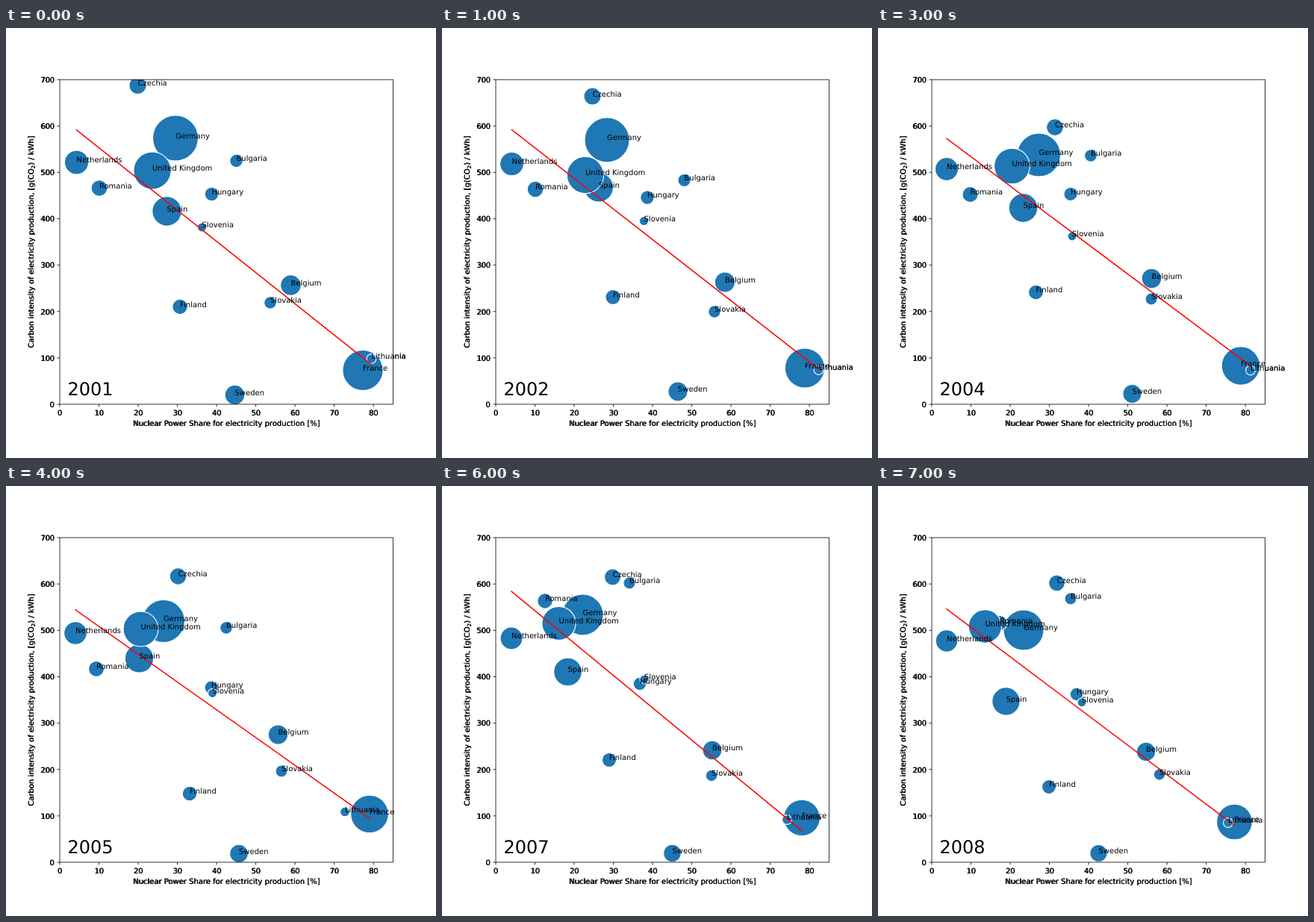
Recreate the animation shown at these times as an HTML page. Size 576x576 px, loop 8 s.

```html
<!DOCTYPE html>
<html lang="en">
<head>
<meta charset="utf-8">
<title>Nuclear share and carbon intensity</title>
<style>
  html, body { margin: 0; width: 100%; height: 100%; overflow: hidden; background: #fff; }
  svg { display: block; width: 100vw; height: 100vh; }
  text { font: 10px "DejaVu Sans", sans-serif; text-rendering: geometricPrecision; white-space: pre; }
  circle { fill: #1f77b4; stroke: #fff; stroke-width: 1.1; }
  .axis { fill: none; stroke: #000; stroke-width: .8; }
  #fit { stroke: #f00; stroke-width: 1.5; stroke-linecap: square; }
  #year { font-size: 24px; }
</style>
</head>
<body>
<svg id="stage" viewBox="0 0 576 576">
  <clipPath id="inside"><rect x="72" y="69.1" width="446.4" height="434.9"/></clipPath>
  <clipPath id="beyond"><rect x="518.8" y="0" width="58" height="576"/></clipPath>
  <g id="dots" clip-path="url(#inside)"></g>
  <line id="fit" clip-path="url(#inside)"/>
  <g id="axes"></g>
  <g id="labels"></g>
  <g id="echoes" clip-path="url(#beyond)"></g>
  <text id="year" x="82.5" y="492"></text>
</svg>
<script>
const STEP = 1000, YEARS = 8, FIRST = 2001;
const LEFT = 72, RIGHT = 518.4, TOP = 69.12, BOTTOM = 504;
const byId = id => document.getElementById(id);

function add(parent, tag, attrs, text) {
  const el = document.createElementNS("http://www.w3.org/2000/svg", tag);
  set(el, attrs);
  if (text !== undefined) el.textContent = text;
  byId(parent).append(el);
  return el;
}

function set(el, attrs) {
  for (const key in attrs) el.setAttribute(key, attrs[key]);
}

// Text outside the plot is printed twice with slightly different spacing.
function twice(x, y, text, anchor, spacing, shift) {
  const attrs = { x, y, "text-anchor": anchor };
  add("axes", "text", attrs, text);
  add("axes", "text", { ...attrs, x: x + shift, "letter-spacing": spacing }, text);
}

function drawAxes() {
  add("axes", "rect", { class: "axis", x: LEFT, y: TOP, width: RIGHT - LEFT, height: BOTTOM - TOP });
  for (let v = 0; v <= 80; v += 10) {
    const x = LEFT + v * (RIGHT - LEFT) / 85;
    add("axes", "path", { class: "axis", d: `M${x} ${BOTTOM}v3.5` });
    twice(x, 519.4, v, "middle", v ? -.5 : 0, .4);
  }
  for (let v = 0; v <= 700; v += 100) {
    const y = BOTTOM - v * (BOTTOM - TOP) / 700;
    add("axes", "path", { class: "axis", d: `M${LEFT} ${y}h-3.5` });
    twice(65, y + 3.8, v, "end", v ? -.5 : 0, -.3);
  }
  twice(295.2, 533, "Nuclear Power Share for electricity production [%]", "middle", -.02, .5);

  const caption = "Carbon intensity of electricity production, [g(CO";
  for (const shift of [0, .6]) {
    const label = add("axes", "text", {
      transform: `translate(37.3 ${286.8 - shift}) rotate(-90)`, "text-anchor": "middle"
    });
    label.innerHTML = `${caption}<tspan font-size="7" dy="1.6" style="font-size:7px">2</tspan><tspan dy="-1.6">) / kWh]</tspan>`;
  }
}

// Radius runs from r0 to r1 over the loop; path holds x, y for each year.
const bubbles = [];
function bubble(name, r0, r1, path) {
  bubbles.push({
    r0, r1, path,
    dot: add("dots", "circle", {}),
    label: add("labels", "text", {}, name),
    echo: add("echoes", "text", { "letter-spacing": -.1 }, name)
  });
}

bubble("Belgium", 13.3, 12.2,
  [381.5, 344.5, 379, 340.5, 366, 333, 366.5, 335.5, 364.5, 333, 359, 343, 362, 354, 359, 356]);
bubble("Bulgaria", 8.2, 7.5,
  [308.5, 178, 324.5, 204, 285, 168, 285, 171, 295, 190, 293, 180, 251, 130, 258, 151]);
bubble("Czechia", 11.1, 10.4,
  [176.5, 77, 201.5, 91.5, 236, 134, 237, 133, 230.5, 121, 234, 123, 228.5, 122, 239.5, 130]);
bubble("Finland", 9.7, 9,
  [233, 373.5, 229, 360.5, 214, 323, 211.5, 354, 246, 412, 218, 342, 224, 367, 229, 403]);
bubble("France", 26.6, 23.4,
  [478, 458.5, 486, 455.5, 482, 453, 486, 452.5, 487, 439.5, 487, 443, 482, 444.5, 477.5, 450]);
bubble("Germany", 30, 26.6,
  [227, 147.5, 221, 150, 215, 158, 215.5, 170, 211, 181, 208, 178, 188.5, 172.5, 195, 193]);
bubble("Hungary", 8.8, 8.2,
  [275.5, 222.5, 275, 227, 242, 213, 258, 222.5, 275, 270, 269, 268, 265, 265, 266, 279]);
bubble("Lithuania", 5.9, 5.9,
  [489.5, 443, 504.5, 458, 507.5, 460, 499, 458.5, 454, 436.5, 437, 440, 462, 447, 469, 451]);
bubble("Netherlands", 15.6, 14.3,
  [94.5, 180, 93.5, 182, 94, 185, 92, 189, 93, 197, 91, 201, 93, 204, 92, 207.5]);
bubble("Romania", 10.4, 9.6,
  [125, 214.5, 125, 216, 118, 207, 123.5, 223, 121, 245, 120, 212, 138, 154, 163, 183.5]);
bubble("Slovakia", 7.8, 7.2,
  [354, 368, 365, 380, 373, 356, 366, 363, 369, 382, 372, 385, 361, 388, 377, 386.5]);
bubble("Slovenia", 5.6, 5.4,
  [262.5, 267, 270.5, 258.5, 270, 260, 260, 279, 276.5, 277.5, 266, 270, 271, 259, 273, 290]);
bubble("Spain", 19.2, 18.2,
  [215.5, 245.5, 210, 213.5, 196, 243, 194.5, 241, 178.5, 231, 177, 245, 168.5, 249, 171.5, 288.5]);
bubble("Sweden", 12.8, 11.1,
  [306.5, 491.5, 316, 487, 332, 485, 340.5, 490, 312, 492.5, 317, 491.5, 308.5, 492, 295.5, 492]);
bubble("United Kingdom", 24.6, 21.7,
  [196, 191, 192, 197, 188, 185, 179.5, 185, 180.5, 191.5, 171, 182, 156.5, 184, 143.5, 188]);

// Least-squares line over the bubble centres, from the leftmost to the rightmost.
function drawFit(points) {
  const mean = f => points.reduce((sum, p) => sum + f(p), 0) / points.length;
  const mx = mean(p => p[0]), my = mean(p => p[1]);
  const slope = mean(p => (p[0] - mx) * (p[1] - my)) / mean(p => (p[0] - mx) ** 2);
  const xs = points.map(p => p[0]);
  const x1 = Math.min(...xs), x2 = Math.max(...xs);
  const at = x => my + slope * (x - mx);
  set(byId("fit"), { x1, y1: at(x1), x2, y2: at(x2) });
}

function show(i) {
  const points = bubbles.map(b => {
    const [x, y] = b.path.slice(2 * i, 2 * i + 2);
    const r = b.r0 + (b.r1 - b.r0) * i / (YEARS - 1) + .5;
    set(b.dot, { cx: x, cy: y, r });
    set(b.label, { x, y: y + .4 });
    set(b.echo, { x: x + .6, y: y + .4 });
    return [x, y];
  });
  drawFit(points);
  byId("year").textContent = FIRST + i;
}

drawAxes();
show(0);
let current = 0;
const start = performance.now();
function tick() {
  const i = Math.floor((performance.now() - start) / STEP) % YEARS;
  if (i !== current) show(current = i);
  requestAnimationFrame(tick);
}
requestAnimationFrame(tick);
</script>
</body>
</html>
```
